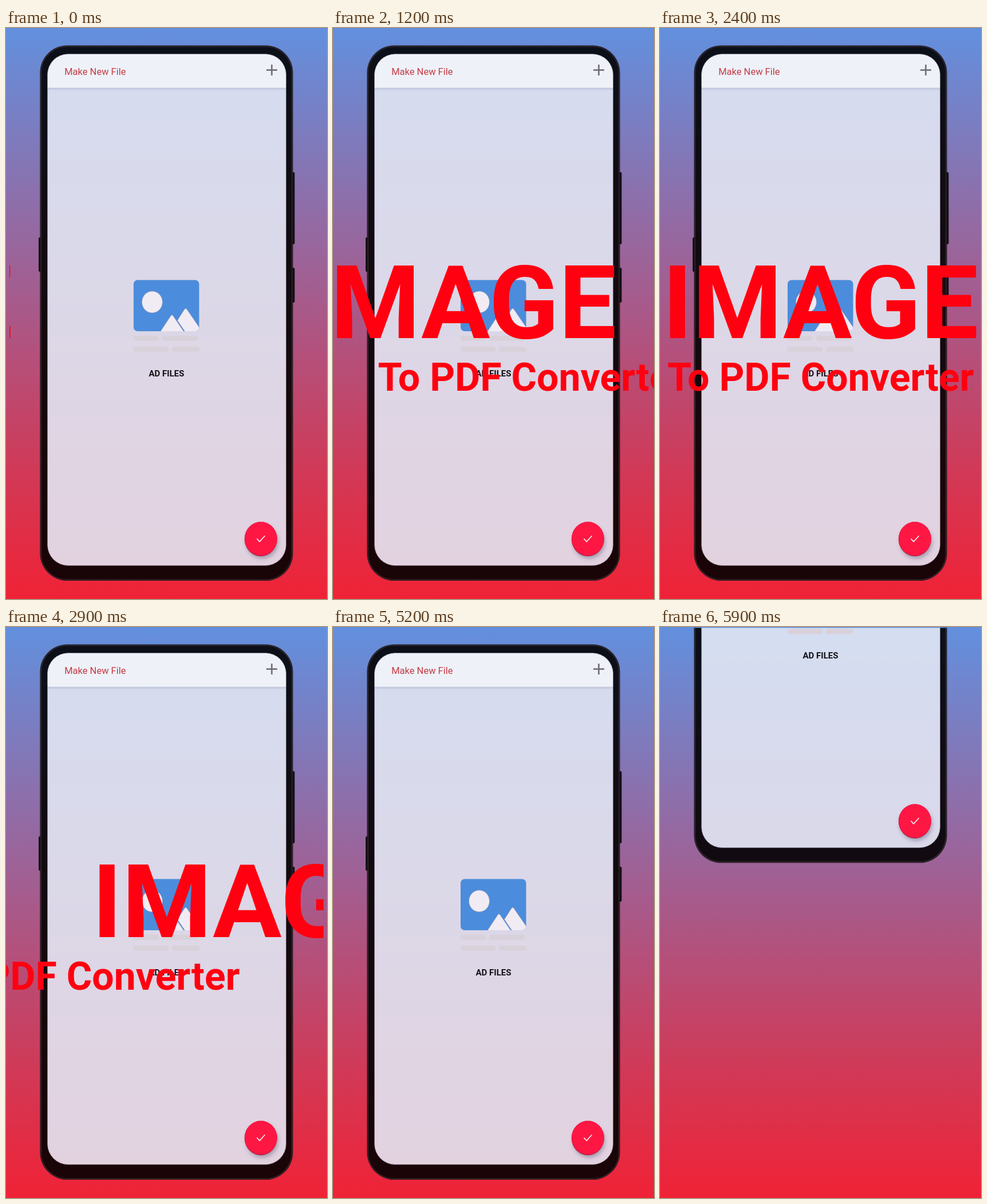
An HTML page for the animation above (6000 ms loop, 561 px wide and 998 px high).

```html
<!DOCTYPE html>
<html lang="en">
<head>
<meta charset="utf-8">
<title>Image to PDF</title>
<style>
  html, body { margin: 0; width: 100%; height: 100%; overflow: hidden; }
  svg { display: block; width: 100%; height: 100%; }
  text { font-family: Roboto, "Liberation Sans", sans-serif; }
  .big { font-weight: 700; fill: #ff0010; text-anchor: middle; }
</style>
</head>
<body>
<svg viewBox="0 0 561 998" preserveAspectRatio="none">
  <defs>
    <linearGradient id="sky" x2="0" y2="1">
      <stop offset="0" stop-color="#6290de"/>
      <stop offset=".4" stop-color="#9b649a"/>
      <stop offset=".75" stop-color="#cd3c5b"/>
      <stop offset="1" stop-color="#f02236"/>
    </linearGradient>
    <linearGradient id="fade" x2="0" y2="1">
      <stop offset="0" stop-color="#5a6080" stop-opacity=".22"/>
      <stop offset="1" stop-color="#5a6080" stop-opacity="0"/>
    </linearGradient>
    <filter id="soft" x="-50%" y="-50%" width="200%" height="200%">
      <feGaussianBlur stdDeviation="3.5"/>
    </filter>
    <clipPath id="stage"><rect y="1.5" width="561" height="997"/></clipPath>
    <clipPath id="screen"><rect x="72.5" y="45.5" width="417" height="894" rx="36"/></clipPath>
    <clipPath id="card"><rect x="223" y="440.5" width="114.5" height="89.5" rx="7"/></clipPath>
    <clipPath id="band"><rect x="6" y="400" width="549" height="160"/></clipPath>
  </defs>

  <rect width="561" height="998" fill="url(#sky)"/>

  <g clip-path="url(#stage)"><g id="phone">
    <!-- buttons and body; the body is slightly see-through -->
    <g fill="#141016">
      <rect x="57" y="366" width="5" height="60" rx="2"/>
      <rect x="499" y="252" width="5.5" height="126" rx="2"/>
      <rect x="499" y="419" width="5.5" height="61" rx="2"/>
    </g>
    <path fill="#000" fill-opacity=".89" fill-rule="evenodd" d="M107 30.5H454a47.5 47.5 0 0 1 47.5 47.5V918.500a47.500 47.500 0 0 1-47.500 47.500H107a47.500 47.500 0 0 1-47.500-47.500V78a47.500 47.500 0 0 1 47.500-47.500Z
      M108.500 45.500a36 36 0 0 0-36 36V903.500a36 36 0 0 0 36 36H453.500a36 36 0 0 0 36-36V81.500a36 36 0 0 0-36-36Z"/>
    <rect x="61" y="32" width="439" height="932.500" rx="46" fill="none" stroke="#4a3a42" stroke-opacity=".5" stroke-width="2.500"/>

    <g clip-path="url(#screen)">
      <rect x="72" y="45" width="418" height="895" fill="#e2e7f3" fill-opacity=".896"/>
      <rect x="72" y="104.500" width="418" height="5" fill="url(#fade)"/>
      <rect x="72" y="45" width="418" height="59.500" fill="#fff" fill-opacity=".6"/>
    </g>
    <rect x="72.500" y="45.500" width="417" height="894" rx="36" fill="none" stroke="#77717c" stroke-opacity=".6"/>

    <text x="102.200" y="81.500" font-size="16.500" fill="#c43c44">Make New File</text>
    <path d="M455 73.500H474M464.500 64V83" stroke="#6c6776" stroke-width="2.500"/>

    <!-- picture card -->
    <g clip-path="url(#card)">
      <rect x="223" y="440" width="115" height="91" fill="#4c8cdc"/>
      <g fill="#f1ecf4" stroke="#8d92b4" stroke-width=".7" stroke-linejoin="round">
        <ellipse cx="255.500" cy="479" rx="18" ry="19"/>
        <path d="M299.500 511 312 491.500Q314 488.500 316 491.500L338 523.500V531H313Z"/>
        <path d="M269.500 531 288 503Q290 500 292 503L311 531Z"/>
      </g>
    </g>
    <g fill="#d9d1da">
      <rect x="222.500" y="538" width="44.500" height="8.500" rx="4"/>
      <rect x="273" y="538" width="62" height="8.500" rx="4"/>
      <rect x="222.500" y="557" width="61.500" height="9" rx="4"/>
      <rect x="290" y="557" width="48" height="9" rx="4"/>
    </g>
    <text x="280.500" y="609" font-size="15" font-weight="700" fill="#121116" text-anchor="middle">AD FILES</text>

    <ellipse cx="447.500" cy="898.500" rx="28" ry="29" fill="#54486a" fill-opacity=".42" filter="url(#soft)"/>
    <ellipse cx="445.300" cy="893.300" rx="28.500" ry="30" fill="#7d2138"/>
    <ellipse cx="445.500" cy="892.800" rx="28.500" ry="29.700" fill="#ff1744"/>
    <path d="M438.500 892.500 443.200 897.800 452.500 887.500" fill="none" stroke="#fff" stroke-width="1.500"/>
  </g></g>

  <g clip-path="url(#band)"><text id="title" class="big" x="275.500" y="542" font-size="179">IMAGE</text></g>
  <text id="sub" class="big" x="285.500" y="634" font-size="68">To PDF Converter</text>
</svg>
<script>
  const LOOP = 6000, STEP = 100;
  const [phone, title, sub] = ['phone', 'title', 'sub'].map(id => document.getElementById(id));
  const move = (el, x, y) => el.setAttribute('transform', `translate(${x} ${y})`);

  // Time left of the entrance, eased out
  const arrive = t => (1 - Math.min(1, Math.max(0, (t - 580) / 1170))) ** 3;
  // Steady acceleration from a start time
  const speedUp = (t, start, rate) => rate * Math.max(0, t - start) ** 2;

  function draw(t) {
    const left = arrive(t);
    move(title, -540 * left + speedUp(t, 2290, 0.000406), 0);
    move(sub, 587 * left - speedUp(t, 2290, 0.000389), 0);
    move(phone, 0, -speedUp(t, 5200, 0.00113));
  }

  const began = performance.now();
  function tick() {
    const t = (performance.now() - began) % LOOP;
    draw(Math.floor(t / STEP) * STEP);
    requestAnimationFrame(tick);
  }
  tick();
</script>
</body>
</html>
```
